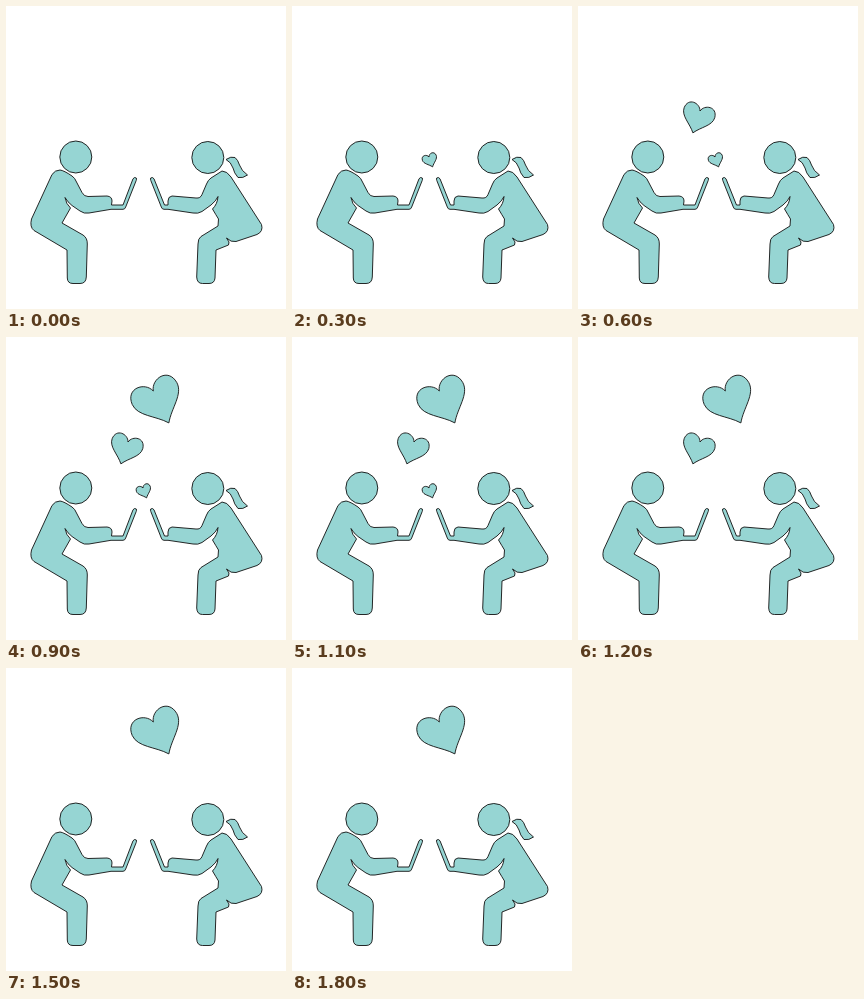
An HTML page for the animation above (2100 ms loop, 280 by 303 pixels).

```html
<!DOCTYPE html>
<html lang="en">
<head>
<meta charset="utf-8">
<title>Hearts between laptops</title>
<style>
html, body { margin: 0; width: 100%; height: 100%; overflow: hidden; background: #fff; }
svg { display: block; width: 100%; height: 100%; }
.ink { fill: #96d5d3; stroke: #111; stroke-width: .9; stroke-linejoin: round; }
#love { fill: #fb8f93; stroke-width: 1.4; }
.heart path { vector-effect: non-scaling-stroke; }
</style>
</head>
<body>
<svg viewBox="0 0 280 303">
  <g class="ink">
    <circle cx="69.8" cy="151" r="16"/>
    <path d="M46 168.5 Q49 164 54 164 Q58 164.5 66 170 Q69 172 70.5 176 L76 186.500 Q78 190.500 82 190.500 L101 190 Q106 190.500 106 195 L105.500 199 H117 L127 172.800 Q128.500 170.600 130.300 172 Q130.800 173 130.200 174.500 L119.700 201 Q119 203.300 117 203.300 H105 L83 207 Q78 208 74 205 L66 199.500 Q61.500 196 59 191.500 Q60 198 64.500 202 L56 217 L77 229 Q81.500 232 81.300 238 L80.300 271 Q80 277.500 74 277.500 H67 Q61.500 277.500 61.300 272 L61 244 L28 224.500 Q23.500 221 25.500 213 Z"/>
    <circle cx="201.800" cy="151.500" r="16"/>
    <path d="M220 153.500 Q225 150 229 151.500 Q232 154 233.500 159 Q235.500 165 241.500 169 Q237 172.500 232 171.500 Q228 167 227 162 Q225 156 220 153.500 Z"/>
    <path d="M225 171 Q221 165 216 165 L205 172 Q202 174 200.500 178 L196 188.500 Q194.500 192.500 190 192 L166 190 Q162 190.500 162 195 L162 199 H158.500 L148 172.800 Q146.500 170.600 144.700 172 Q144.200 173 144.800 174.500 L155.300 201 Q156 203.300 158 203.300 H162 L187 207 Q192 208 196 205.500 L205 199 Q210 195 212 190.500 Q211.500 198 206.500 203 Q210 209 212.500 213 L212 220 L195 230.500 Q192 232.500 192 238 L190.700 271 Q191 277.500 196.500 277.500 H203 Q208.500 277.500 209 272 L210 244 L222.500 239 Q224.500 236.500 220.500 232 Q225 236.500 230 235.500 L251 228.500 Q257.500 225.500 255.500 218.500 Z"/>
  </g>
  <g class="ink heart" id="hearts"></g>
</svg>
<script>
const LOOP = 2100;
const SHAPE = 'M0 0C-.1 -.34 -.67 -.42 -.7 .08C-.71 .45 -.25 .65 0 1C.25 .65 .71 .45 .7 .08C.67 -.42 .1 -.34 0 0Z';
const group = document.getElementById('hearts');

function addHeart(x, y, size, tilt, visible, id) {
  const el = document.createElementNS('http://www.w3.org/2000/svg', 'path');
  el.setAttribute('d', SHAPE);
  el.setAttribute('transform', `translate(${x} ${y}) rotate(${tilt}) scale(${size})`);
  if (id) el.id = id;
  group.append(el);
  return { el, visible };
}

const during = (from, to) => t => t >= from && t < to;
const beat = during(1000, 1100);

const hearts = [
  addHeart(137, 151, 10.5, -20, during(300, 1200)),
  addHeart(122, 105, 23, 18, during(600, 1500)),
  addHeart(147.3, 54, 35.5, -26, t => t >= 900 && !beat(t)),
  addHeart(145.5, 46.5, 44.5, -28, beat, 'love')
];

function draw(t) {
  for (const { el, visible } of hearts) {
    el.setAttribute('visibility', visible(t) ? 'visible' : 'hidden');
  }
}

function tick() {
  draw(performance.now() % LOOP);
  requestAnimationFrame(tick);
}
tick();
</script>
</body>
</html>
```
